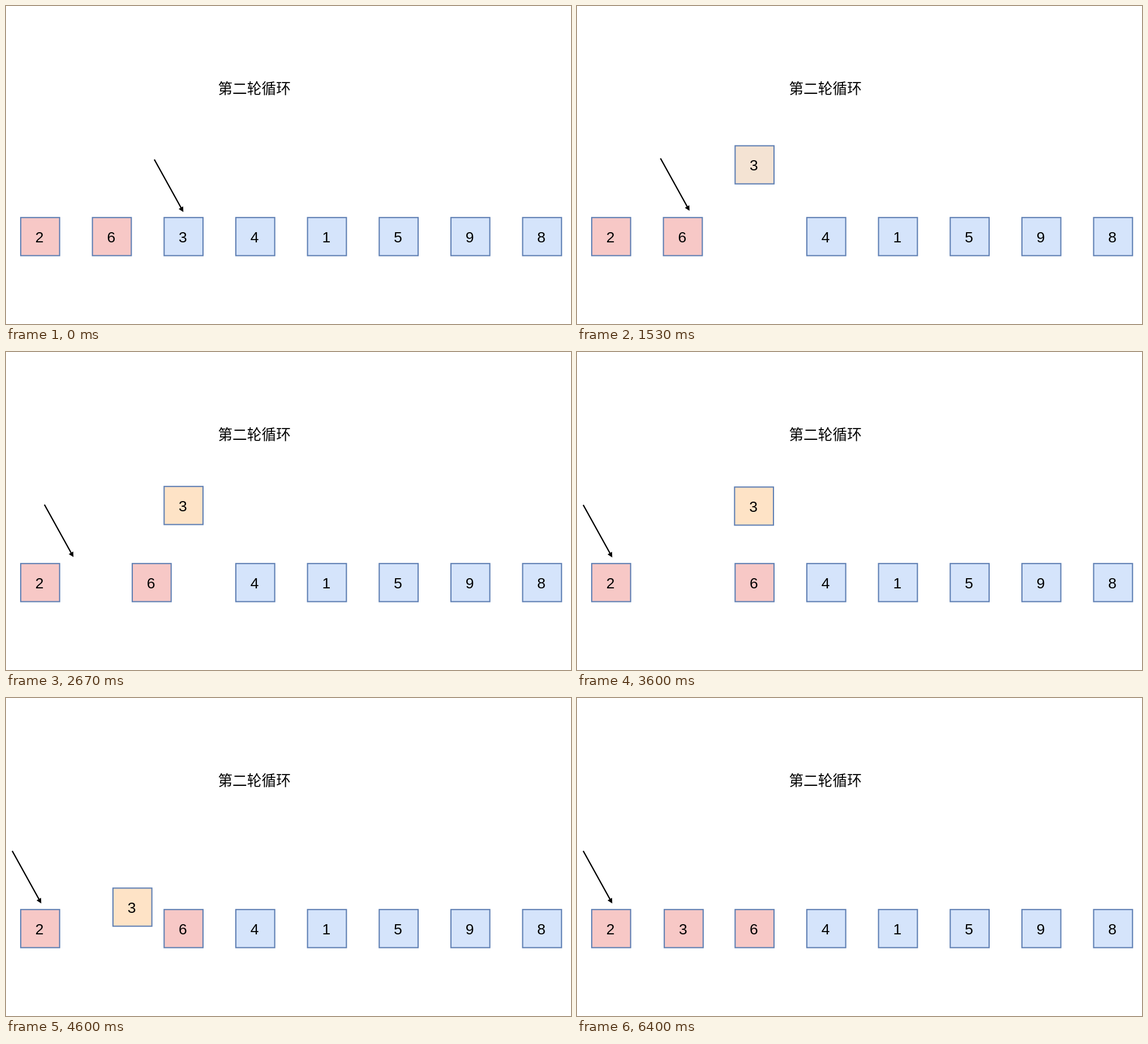
Animation, 998 px wide and 561 px high, one loop 7.07 s. Source, as an HTML page:

```html
<!DOCTYPE html>
<html lang="zh">
<head>
<meta charset="utf-8">
<title>插入排序</title>
<style>
  html, body { margin: 0; width: 100%; height: 100%; overflow: hidden; background: #fff; }
  svg { display: block; width: 998px; height: 561px; }
  rect { stroke: #6080b4; stroke-width: 2.1; }
  .digit { font: 26.5px "Liberation Sans", Arial, sans-serif; text-anchor: middle; }
  .title { font: 25.7px "Noto Sans CJK SC", "Noto Sans CJK", "Noto Sans CJK JP", sans-serif; }
</style>
</head>
<body>
<svg id="stage" viewBox="0 0 998 561">
  <text class="title" x="374.4" y="154.6">第二轮循环</text>
  <g id="boxes"></g>
  <g id="arrow">
    <path d="M0 0L47.4 85.5" stroke="#000" stroke-width="2.3"/>
    <path d="M51.3 92.6L43 87.2L50.9 82.8Z"/>
  </g>
</svg>
<script>
const LOOP = 7070, FPS = 15;
const BLUE = [213, 228, 251], PINK = [247, 200, 198], ORANGE = [254, 227, 198];
const slot = i => 26 + i * 126.65;
const ROW = 373.2, LIFT = -136;

const sine = u => (1 - Math.cos(Math.PI * u)) / 2;
const quad = u => u < .5 ? 2 * u * u : 1 - 2 * (1 - u) ** 2;
const span = (t, from, to) => Math.min(1, Math.max(0, (t - from) / (to - from)));
const mix = (a, b, p) => a + (b - a) * p;
const rgb = c => `rgb(${c.map(Math.round)})`;
const blend = (a, b, p) => a.map((v, i) => mix(v, b[i], p));
const place = (el, x, y) => el.setAttribute('transform', `translate(${x.toFixed(2)} ${y.toFixed(2)})`);

function makeBox(digit, i) {
  const g = document.createElementNS('http://www.w3.org/2000/svg', 'g');
  g.innerHTML = `<rect width="68.7" height="67.2"/><text class="digit" x="33.2" y="43.6">${digit}</text>`;
  g.firstChild.setAttribute('fill', rgb(i < 2 ? PINK : BLUE));
  place(g, slot(i), ROW);
  document.getElementById('boxes').append(g);
  return g;
}

const boxes = [...'26341598'].map(makeBox);
const six = boxes[1], three = boxes[2];
const arrow = document.getElementById('arrow');

function draw(t) {
  const lift = sine(span(t, 503, 1743));
  const shift = sine(span(t, 2000, 3245));
  const drop = quad(span(t, 3490, 5260));

  place(arrow, 262 - 123 * lift - 128 * shift, 270.8 - 2.2 * lift + 1.2 * shift);
  place(six, mix(slot(1), slot(2), shift), ROW);
  place(three, mix(slot(2), slot(1) + 1.5, drop), ROW + LIFT * (lift - drop));

  const warm = blend(BLUE, ORANGE, span(t, 400, 1900));
  three.firstChild.setAttribute('fill', rgb(blend(warm, PINK, span(t, 5200, 6350))));
}

const start = performance.now();
function tick() {
  const t = (performance.now() - start) % LOOP;
  // hold each pose for one 15 fps step
  draw(Math.floor((t + 4) * FPS / 1000) * 1000 / FPS);
  requestAnimationFrame(tick);
}
tick();
</script>
</body>
</html>
```
